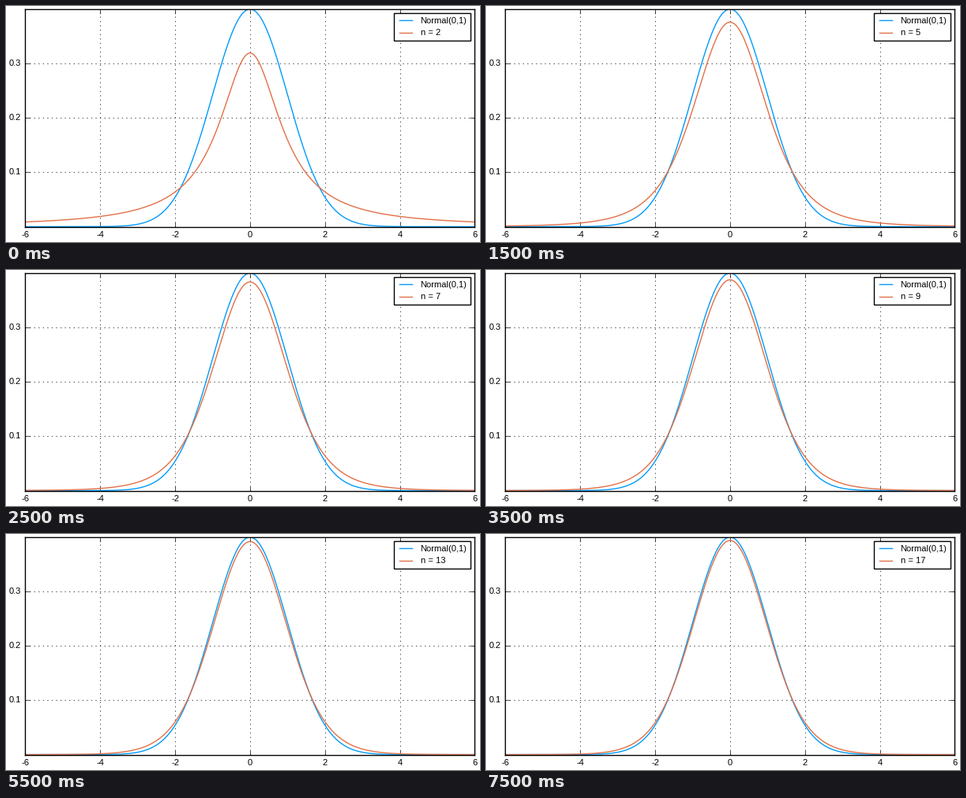
Recreate the animation shown at these times as a matplotlib script. Size 600 px wide and 300 px high, loop 8 s.

```python
import math

import numpy as np
import matplotlib.pyplot as plt
from matplotlib.animation import FuncAnimation

W, H, DPI = 600, 300, 100
LEFT, RIGHT, TOP, BOTTOM = 24.42, 593.42, 3.93, 280.5
BLUE, ORANGE = "#009afa", "#e36f47"
FIRST_N, LAST_N = 2, 17

plt.style.use("classic")
plt.rcParams.update({
    "font.family": "Liberation Sans",
    "font.size": 8,
    "figure.facecolor": "white",
    "axes.axisbelow": True,
})


def normal_pdf(x):
    return np.exp(-x**2 / 2) / math.sqrt(2 * math.pi)


def student_pdf(x, df):
    log_c = math.lgamma((df + 1) / 2) - math.lgamma(df / 2)
    c = math.exp(log_c) / math.sqrt(df * math.pi)
    return c * (1 + x**2 / df) ** (-(df + 1) / 2)


fig = plt.figure(figsize=(W / DPI, H / DPI), dpi=DPI)
ax = fig.add_axes([LEFT / W, 1 - BOTTOM / H,
                   (RIGHT - LEFT) / W, (BOTTOM - TOP) / H])

x = np.linspace(-6, 6, 601)
ax.plot(x, normal_pdf(x), color=BLUE, lw=1, label="Normal(0,1)")
(curve,) = ax.plot(x, student_pdf(x, FIRST_N - 1), color=ORANGE, lw=1,
                   label=f"n = {FIRST_N}")

ax.set_xlim(-6, 6)
ax.set_ylim(0, normal_pdf(0))
xticks = range(-6, 7, 2)
ax.set_xticks(xticks, [str(t) for t in xticks])
ax.set_yticks([0.1, 0.2, 0.3], ["0.1", "0.2", "0.3"])
ax.tick_params(labelsize=8)
ax.grid(True)
legend = ax.legend(loc="upper right", fontsize=8, handletextpad=0.65)
n_label = legend.get_texts()[1]


def update(i):
    n = FIRST_N + i
    curve.set_ydata(student_pdf(x, n - 1))
    n_label.set_text(f"n = {n}")
    return curve, n_label


anim = FuncAnimation(fig, update, frames=LAST_N - FIRST_N + 1,
                     interval=500, repeat=True, repeat_delay=0, blit=False)
plt.show()
```
